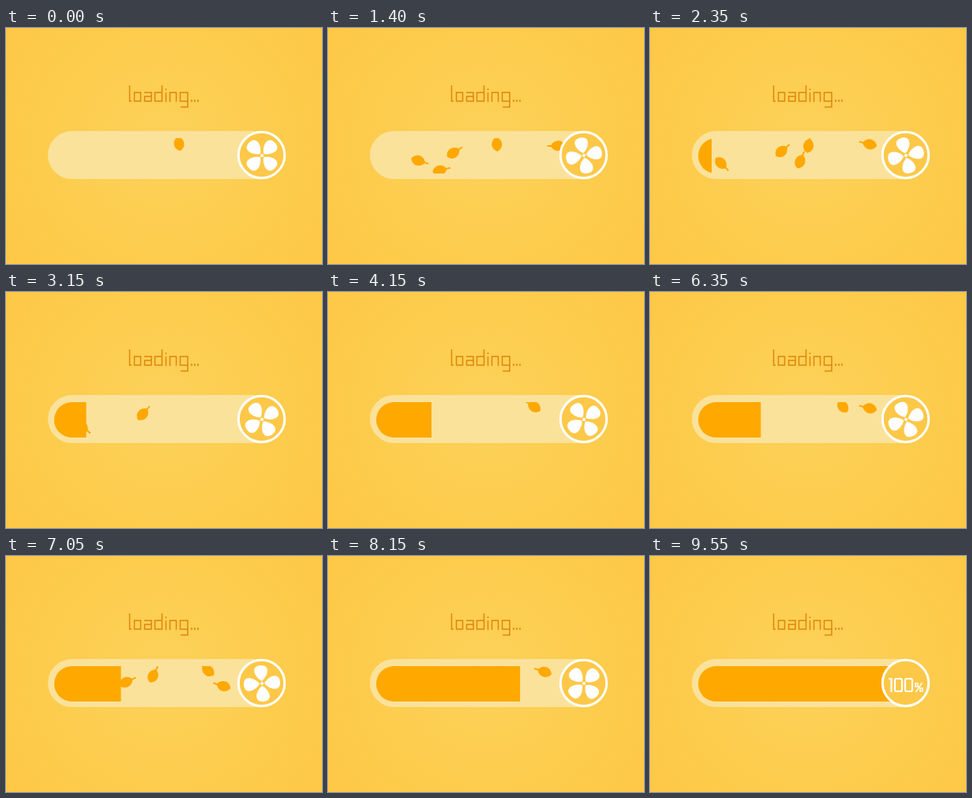
An HTML page with a canvas for the animation above (9.65 s loop, 400 by 300 pixels).

```html
<!DOCTYPE html>
<html lang="en">
<head>
<meta charset="utf-8">
<title>loading...</title>
<style>
  html, body { margin: 0; width: 100%; height: 100%; overflow: hidden; background: #fec947; }
  canvas { display: block; }
</style>
</head>
<body>
<canvas id="stage" width="400" height="300" role="img" aria-label="loading..."></canvas>
<script>
const ctx = document.getElementById('stage').getContext('2d');
const LOOP = 9650, TAU = Math.PI * 2, DEG = Math.PI / 180;
const CX = 323.5, CY = 161.5;

// Letters are drawn as thin square strokes
const loadingPath = new Path2D(
  'M156.5 73V93H159 M162.5 82H170.5V93H162.5Z M175 82H184V93H175.5V87H184' +
  'M197.5 73V93H188.5V82H197.5 M202.5 82V94 M202.5 77V79 M207.5 94V82H215.5V94' +
  'M230 93H220.5V82H230V100.5H221 M235 91V94 M239 91V94 M243 91V94');
const zero = 'h5q2 0 2 2v12q0 2 -2 2h-5q-2 0 -2 -2v-12q0 -2 2 -2z';
const hundredPath = new Path2D('M302 156H305.5V173 M312 156' + zero + 'M325 156' + zero);
const percentPath = new Path2D('M336 162H339V166H336Z M342 168H345V172H342Z M344.5 161L336.5 173');
const leafPath = new Path2D('M-10 0C-6 -9 4 -8 8 -1L13 -1V1L8 1C4 8 -6 9 -10 0Z');
const petalPath = new Path2D('M3 0C9 -9 23 -13 23 0C23 13 9 9 3 0Z');

// Moments in seconds at which the fan blows out a leaf
const gusts = [-0.57, 0.03, 0.24, 0.37, 0.79, 1.38, 1.56, 1.64, 2.23, 3.9, 4.43,
  5.97, 6.23, 6.76, 6.91, 7.3, 7.6, 8, 8.4];

// Right edge of the fill: [ms, x]
const fillKeys = [[1900, 60], [2350, 78], [4150, 131], [5450, 133.5], [7050, 145.5], [9050, 323]];

const clamp = v => Math.max(0, Math.min(1, v));
const easeOut = v => 1 - (1 - v) ** 3;

function fillEdge(t) {
  return fillKeys.reduce((x, [t1, x1], i) => {
    const [t0, x0] = fillKeys[i - 1] || [0, x1];
    return x + (x1 - x0) * clamp((t - t0) / (t1 - t0));
  }, fillKeys[0][1]);
}

function pill(left, middle, radius) {
  ctx.beginPath();
  ctx.arc(left + radius, middle, radius, Math.PI / 2, Math.PI * 1.5);
  ctx.lineTo(CX, middle - radius);
  ctx.lineTo(CX, middle + radius);
  ctx.closePath();
}

function strokePath(path, color, width) {
  ctx.strokeStyle = color;
  ctx.lineWidth = width;
  ctx.stroke(path);
}

function drawBackground() {
  const glow = ctx.createRadialGradient(200, 150, 0, 200, 150, 250);
  glow.addColorStop(0, '#fcd159');
  glow.addColorStop(0.6, '#fdcc4d');
  glow.addColorStop(1, '#fec846');
  ctx.fillStyle = glow;
  ctx.fillRect(0, 0, 400, 300);
}

// Leaves drift left along one wave, turning as they go; every fourth rides lower
function drawLeaf(birth, index, t) {
  const age = t / 1000 - birth;
  if (age < 0) return;
  const x = 293 - 130 * age;
  const lane = index % 4 === 2 ? 177 : 159;
  ctx.save();
  ctx.translate(x, lane - 14 * Math.sin((x - 157) / 55));
  ctx.rotate((147 * age - 184) * DEG);
  ctx.fill(leafPath);
  ctx.restore();
}

function drawFan(scale, angle) {
  ctx.save();
  ctx.translate(CX + 0.5, CY + 0.5);
  ctx.rotate(angle * DEG);
  ctx.scale(scale, scale);
  ctx.fillStyle = '#fff';
  for (let i = 0; i < 4; i++) {
    ctx.fill(petalPath);
    ctx.rotate(Math.PI / 2);
  }
  ctx.beginPath();
  ctx.arc(0, 0, 2, 0, TAU);
  ctx.fill();
  ctx.restore();
}

function drawHundred(scale) {
  ctx.save();
  ctx.translate(CX, CY);
  ctx.scale(scale, scale);
  ctx.translate(-CX, -CY);
  strokePath(hundredPath, '#fff', 2.2);
  strokePath(percentPath, '#fff', 1.5);
  ctx.restore();
}

function draw(t, step) {
  drawBackground();
  strokePath(loadingPath, '#dd870b', 1.5);

  ctx.fillStyle = '#fbe29b';
  pill(53, CY, 30.5);
  ctx.fill();

  ctx.save();
  pill(61, 162.5, 22.5);
  ctx.clip();
  ctx.fillStyle = '#ffa800';
  ctx.fillRect(60, 130, fillEdge(t) - 60, 64);
  gusts.forEach((birth, i) => drawLeaf(birth, i, t));
  ctx.restore();

  ctx.beginPath();
  ctx.arc(CX, CY, 29.2, 0, TAU);
  ctx.fillStyle = '#fdc848';
  ctx.fill();
  ctx.strokeStyle = '#fff';
  ctx.lineWidth = 3;
  ctx.stroke();

  const fan = 1 - clamp((t - 9050) / 300);
  const label = easeOut(clamp((t - 9250) / 300));
  if (fan > 0) drawFan(fan, 45 - step * 36.2);
  if (label > 0) drawHundred(label);
}

// The picture advances in 100 ms steps, with one short step at 2000 ms
function tick() {
  const now = performance.now() % LOOP;
  const late = now >= 2050 ? 1 : 0;
  const count = Math.floor((now - 50 * late) / 100);
  draw(count * 100 + 50 * late, count + late);
  requestAnimationFrame(tick);
}
tick();
</script>
</body>
</html>
```
